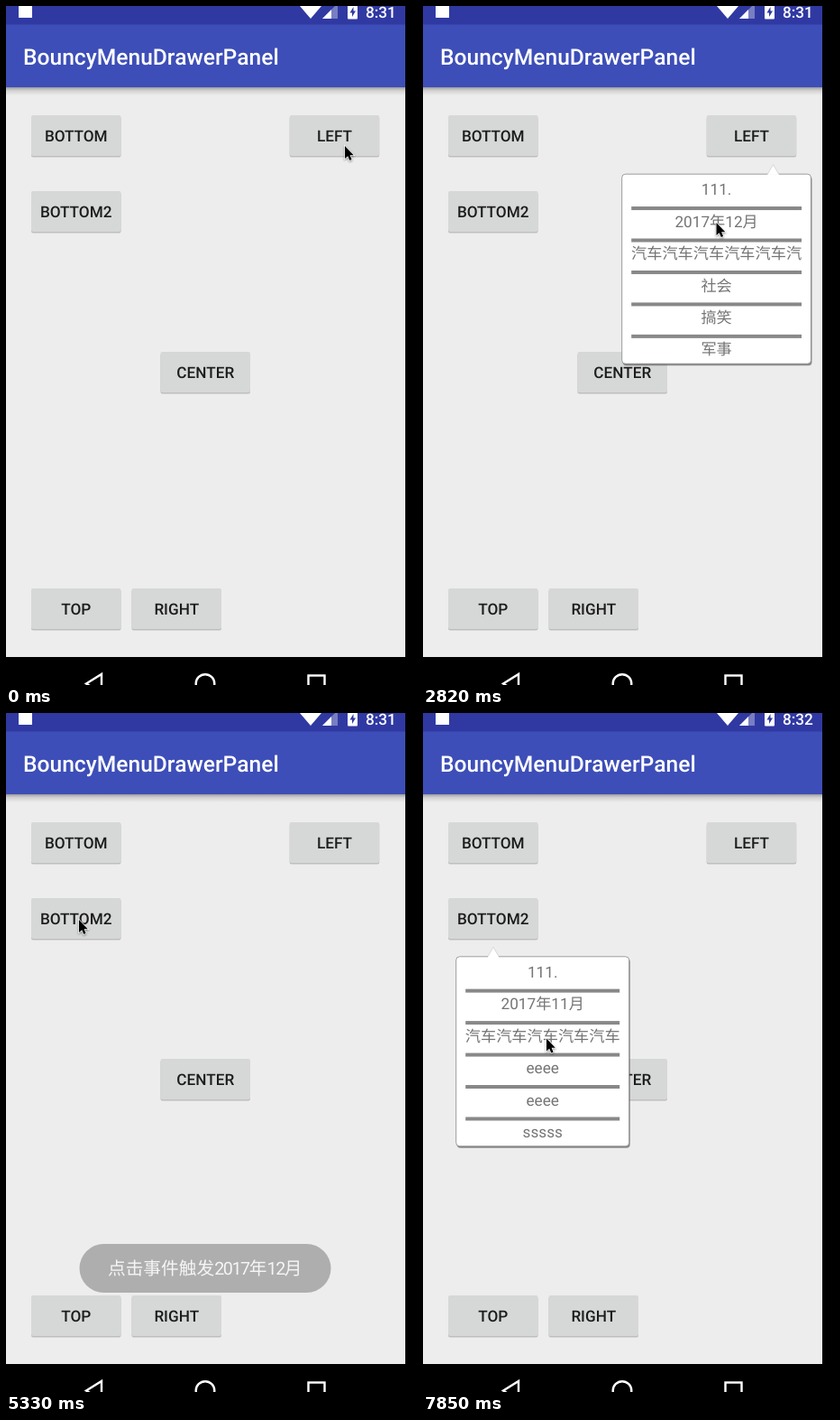
Recreate the animation shown at these times as an HTML page. Size 456x752 px, loop 7990 ms.

```html
<!DOCTYPE html>
<html lang="zh-CN">
<head>
<meta charset="utf-8">
<style>
  html, body { margin: 0; width: 100%; height: 100%; overflow: hidden; background: #000; }
  svg { display: block; width: 456px; height: 752px; }
  text { font-family: Roboto, "Noto Sans CJK SC", "Noto Sans CJK", sans-serif; font-size: 17.2px; text-rendering: geometricPrecision; }
  .medium { font-weight: 500; }
  .mid { text-anchor: middle; }
</style>
</head>
<body>
<svg viewBox="0 0 456 752">
  <defs>
    <linearGradient id="fade" x2="0" y2="1">
      <stop stop-opacity=".34"/>
      <stop offset=".4" stop-opacity=".12"/>
      <stop offset="1" stop-opacity="0"/>
    </linearGradient>
  </defs>
  <rect width="456" height="752"/>
  <rect width="443" height="721" fill="#ededed"/>
  <rect y="90" width="443" height="9" fill="url(#fade)"/>
  <rect width="443" height="90" fill="#3d4eb8"/>
  <rect width="443" height="20.5" fill="#3039a2"/>
  <g fill="#fff">
    <rect x="14" y="-2" width="15" height="15"/>
    <path d="M326 0H350L338 14Z"/>
    <path d="M351 14H368V-3Z" opacity=".35"/>
    <path d="M351 14H361V4Z"/>
    <rect x="379" y="-2" width="11" height="16.5" rx="1"/>
    <path d="M385.5 1L381.5 7.5H384V12L388 5.5H385.5Z" fill="#3039a2"/>
    <text id="clock" class="medium" x="399" y="13"></text>
    <text class="medium" x="19" y="64.5" style="font-size:24.6px">BouncyMenuDrawerPanel</text>
  </g>
  <g fill="none" stroke="#fff" stroke-width="2.4">
    <path d="M89 750.5L106 740V761Z"/>
    <circle cx="221" cy="750.5" r="10.3"/>
    <rect x="335.5" y="741.5" width="18" height="18"/>
  </g>
  <g id="buttons"></g>
  <g id="popups"></g>
  <g id="toast">
    <rect x="81.5" y="588" width="279" height="54" rx="27" fill="#666"/>
    <text x="113" y="622" fill="#fff" style="font-size:19.7px">点击事件触发<tspan letter-spacing="-1.4">2017</tspan>年<tspan letter-spacing="-1.4">12</tspan>月</text>
  </g>
  <path id="cursor" d="M0 0V14L3.2 11.2L5.3 16L7.6 15L5.6 10.3H9.8Z" stroke="#fff" stroke-width="1.4" paint-order="stroke" style="filter:drop-shadow(0 1px 1px #0006)"/>
</svg>
<script>
const LOOP = 7990, STEP = 148;
const $ = id => document.getElementById(id);

function add(parent, html) {
  parent.insertAdjacentHTML('beforeend', html);
  return parent.lastElementChild;
}

function button(label, x, y) {
  const box = `x="${x}" width="99.5" height="45" rx="2"`;
  return add($('buttons'), `<g>
    <rect ${box} y="${y + 1.6}" fill="#000" opacity=".2"/>
    <rect class="face" ${box} y="${y}" fill="#d6d8d7"/>
    <text class="medium mid" x="${x + 49.75}" y="${y + 29.3}" fill="#1c1c1c">${label}</text></g>`);
}

function popup(x, y, w, tip, rows) {
  const center = x + w / 2;
  const box = `width="${w}" height="210" rx="4"`;
  const items = rows.map((row, i) => {
    const top = y + i * 35.45;
    const rule = i ? `<rect x="${x + 10.5}" y="${top + .4}" width="${w - 21}" height="4" fill="#888"/>` : '';
    return `${rule}<text class="mid" x="${center}" y="${top + 23}" fill="#757575">${row}</text>`;
  }).join('');
  return add($('popups'), `<g>
    <rect class="shadow" x="${x + 1}" y="${y + 2}" ${box} fill="#4c4c4c"/>
    <rect x="${x}" y="${y}" ${box} fill="#fff" stroke="#777" stroke-width=".7"/>
    <path d="M${tip - 6.5} ${y + .6}L${tip} ${y - 10.5}L${tip + 6.5} ${y + .6}" fill="#fff" stroke="#bbb" stroke-width=".5"/>
    <path d="M${tip - 6} ${y + .6}h12" stroke="#fff" stroke-width="1.2"/>
    ${items}</g>`);
}

button('BOTTOM', 28, 121);
button('CENTER', 171.5, 383);
button('TOP', 28, 645);
button('RIGHT', 139.5, 645);
const left = button('LEFT', 314.7, 121);
const bottom2 = button('BOTTOM2', 28, 205);
const car = n => '汽车'.repeat(6).slice(0, n);
const leftPopup = popup(220.7, 186.2, 209.8, 388.5,
  ['111.', '2017年12月', car(11), '社会', '搞笑', '军事']);
const bottomPopup = popup(36.7, 269.8, 192, 78,
  ['111.', '2017年11月', car(10), 'eeee', 'eeee', 'sssss']);

const cursorPath = [[8, 376, 155], [13, 335, 217], [16, 325, 236], [17, 325.5, 240], [22, 325.5, 240],
  [25, 346, 261], [29, 346, 261], [36, 81, 229], [37, 80.5, 233.5], [47, 80.5, 233.5], [51, 137, 360.5]];
const toastAlpha = [[21, 0], [22, .31], [23, .75], [25, 1], [34, 1], [35, .85], [36, .46], [37, 0]];

function at(keys, n) {
  const i = keys.findIndex(key => key[0] > n);
  if (i < 0) return keys.at(-1).slice(1);
  if (i === 0) return keys[0].slice(1);
  const [a, b] = [keys[i - 1], keys[i]];
  const p = (n - a[0]) / (b[0] - a[0]);
  return a.slice(1).map((v, j) => v + (b[j + 1] - v) * p);
}

function press(el, down) {
  el.querySelector('.face').setAttribute('fill', down ? '#c6c8c7' : '#d6d8d7');
}

function showPopup(el, n, start, end) {
  el.setAttribute('opacity', n < start || n > end ? 0 : n === start ? .5 : 1);
  el.querySelector('.shadow').setAttribute('opacity', n === end ? .6 : 1);
}

function draw(now) {
  const n = Math.floor(now % LOOP / STEP);
  $('cursor').setAttribute('transform', `translate(${at(cursorPath, n)})`);
  $('toast').setAttribute('opacity', at(toastAlpha, n)[0]);
  $('clock').textContent = n < 37 ? '8:31' : '8:32';
  press(left, n === 4 || n === 5);
  press(bottom2, n >= 39 && n <= 41);
  showPopup(leftPopup, n, 5, 19);
  showPopup(bottomPopup, n, 41, 53);
}

function tick() {
  draw(performance.now());
  requestAnimationFrame(tick);
}
tick();
</script>
</body>
</html>
```
